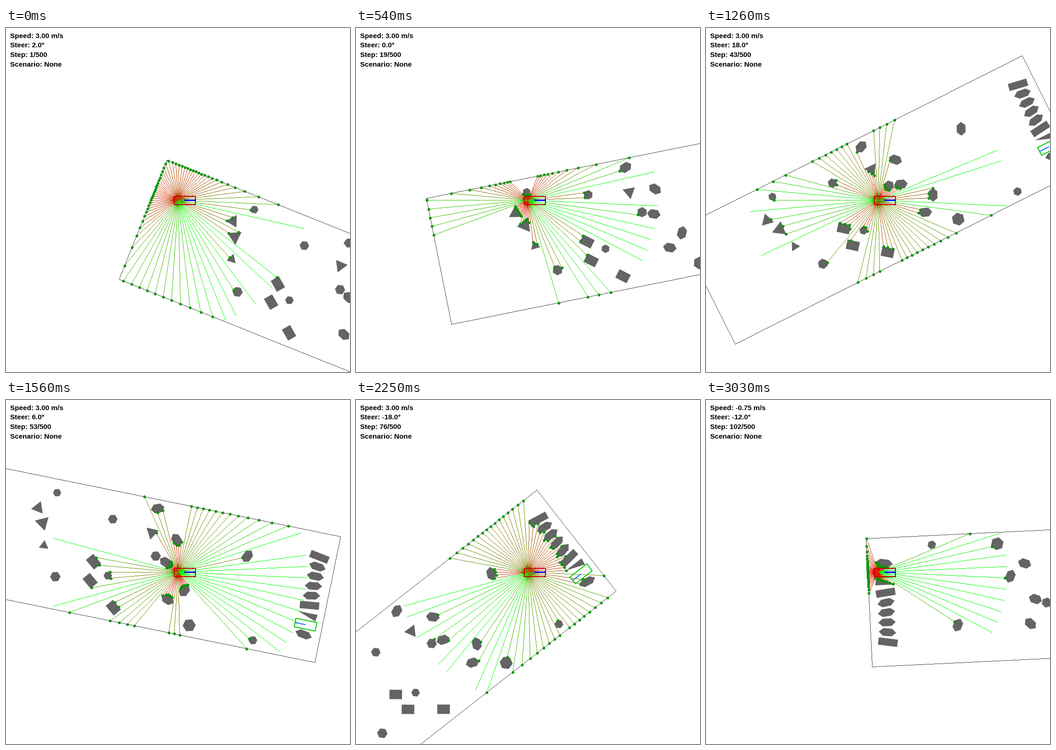
Recreate the animation shown at these times as a matplotlib script. Size 748 by 748 pixels, loop 3.06 s.

```python
import numpy as np
import matplotlib.pyplot as plt
from matplotlib.animation import FuncAnimation
from matplotlib.collections import PolyCollection

SIZE, DPI, FRAMES = 748, 100, 102
PX = 72 / DPI                  # points per pixel
CENTER = np.array([374.0, 374.0])
REACH = 280.5                  # lidar range
STEP = 9.35 / 3                # pixels per frame for 1 m/s
WHEELBASE = 29
ROOM = np.array([839.5, 279.3])
SLOT = np.array([803, 52.3])   # first parking slot
PITCH = 21.5                   # distance between slots
REVERSE_AT = 88

# frame, x, y, heading, steer
KEYS = [
    (0, 55.2, 71.8, -21.8, 2),
    (18, 216.4, 47.4, 11.35, 0),
    (33, 348.7, 94.3, 25.1, 0),
    (42, 418.6, 139.6, 26.75, 18),
    (63, 607.3, 122.2, -12.42, 0),
    (67, 644.0, 114.4, -10, -8),
    (86, 747.4, 225.0, 105.2, -18),
    (REVERSE_AT, 740.7, 242.5, 117, -18),
    (101, 816.8, 205.1, 182.75, -12),
]

ROUND = [(216.5, 29.2, 9), (360.4, 184, 9.3), (697.6, 259, 9.6),      # x, y, radius
         (249, 209, 11.4), (346.5, 61.5, 10.4), (454, 121.6, 11.2),
         (555.3, 254.6, 14.3)]
OVAL = [(437.5, 19.2, -22), (491.5, 77.7, 45), (478.2, 130.5, 21),    # x, y, angle
        (498, 209, 21), (530.2, 182.7, 115), (649.5, 82, 115)]
CRATES = [(324, 160.6), (325, 202.5), (386, 250)]
TRIANGLES = [(182.7, 69.9, 15.6, 40), (198.7, 99.7, 17.8, 64),        # x, y, radius, angle
             (211.2, 147.5, 12, 25), (435.6, 73.1, 15.7, 91)]


def rotation(deg):
    a = np.radians(deg)
    return np.array([[np.cos(a), -np.sin(a)], [np.sin(a), np.cos(a)]])


def place(unit, x, y, rx, ry, deg):
    return unit * (rx, ry) @ rotation(deg).T + (x, y)


def ngon(n):
    a = 2 * np.pi * np.arange(n) / n
    return np.column_stack([np.cos(a), np.sin(a)])


HEX, TRI = ngon(6), ngon(3)
BOX = np.array([(-1, -1), (1, -1), (1, 1), (-1, 1)])
WEDGE = np.array([(-1, -0.3), (1, -0.3), (0.9, 0.7)])


def parked(i, kind):
    x, y = SLOT + (0, i * PITCH)
    tilt = 10 * np.cos(0.8 * i)
    if kind == "box":
        return place(BOX, x, y, 21, 8, tilt)
    if kind == "wedge":
        return place(WEDGE, x, y, 21.5, 15, 0)
    return place(HEX, x, y, 19, 9.6, tilt)


row = ["box"] + ["hex"] * 4 + ["box", "wedge", "free", "hex"]
obstacles = (
    [place(HEX, x, y, r, r, 45) for x, y, r in ROUND]
    + [place(HEX, x, y, 15, 11, a) for x, y, a in OVAL]
    + [place(BOX, x, y, 13.7, 10.2, 38.5) for x, y in CRATES]
    + [place(TRI, x, y, r, r, a) for x, y, r, a in TRIANGLES]
    + [parked(i, kind) for i, kind in enumerate(row) if kind != "free"])
room = (BOX + 1) / 2 * ROOM
spot = SLOT + (0, row.index("free") * PITCH)
goal = place(BOX, *spot, 23.3, 9.5, 180)
goal_arrow = np.array([spot, spot - (23.3, 0)])

solids = obstacles + [room]
seg_a = np.vstack(solids)
seg_b = np.vstack([np.roll(s, -1, axis=0) for s in solids])
ray_angle = np.linspace(-np.pi, np.pi, 72)
rays = np.column_stack([np.cos(ray_angle), np.sin(ray_angle)])


def motion(x, y, head, steer, speed):
    """Position, velocity and acceleration of a pose."""
    h, v = np.radians(head), speed * STEP
    bend = -np.tan(np.radians(steer)) / WHEELBASE
    return (np.array([x, y]), v * np.array([np.cos(h), np.sin(h)]),
            v * v * bend * np.array([-np.sin(h), np.cos(h)]))


def quintic(start, end, T, t):
    """Smooth path between two poses, with its first two derivatives."""
    (p0, v0, a0), (p1, v1, a1) = start, end
    dp = p1 - p0 - v0 * T - a0 * T * T / 2
    dv = (v1 - v0 - a0 * T) * T
    da = (a1 - a0) * T * T
    c3 = (10 * dp - 4 * dv + da / 2) / T**3
    c4 = (-15 * dp + 7 * dv - da) / T**4
    c5 = (6 * dp - 3 * dv + da / 2) / T**5
    pos = p0 + v0 * t + a0 * t**2 / 2 + c3 * t**3 + c4 * t**4 + c5 * t**5
    vel = v0 + a0 * t + 3 * c3 * t**2 + 4 * c4 * t**3 + 5 * c5 * t**4
    acc = a0 + 6 * c3 * t + 12 * c4 * t**2 + 20 * c5 * t**3
    return pos, vel, acc


def car_state(frame):
    back = frame > REVERSE_AT
    sign = -1 if back else 1
    k0, k1 = next(p for p in zip(KEYS, KEYS[1:]) if frame <= p[1][0])
    start = motion(*k0[1:4], sign * k0[4], sign * 3)
    end = motion(*k1[1:], -0.75 if back else 3)
    pos, vel, acc = quintic(start, end, k1[0] - k0[0], frame - k0[0])
    head = np.degrees(np.arctan2(sign * vel[1], sign * vel[0]))
    rate = np.hypot(*vel)
    bend = sign * (vel[0] * acc[1] - vel[1] * acc[0]) / rate**3
    steer = np.clip(-np.degrees(np.arctan(bend * WHEELBASE)), -18, 18)
    speed = max(-3, -round(4 * rate / STEP) / 4) if back else 3
    return pos, head, 2 * round(steer / 2) + 0.0, speed


def cast(a, b):
    """Distance along every ray to the nearest segment."""
    e, q = b - a, a - CENTER
    det = rays[:, :1] * e[:, 1] - rays[:, 1:] * e[:, 0]
    det = np.where(np.abs(det) < 1e-9, 1e-9, det)
    dist = (q[:, 0] * e[:, 1] - q[:, 1] * e[:, 0]) / det
    along = (q[:, 0] * rays[:, 1:] - q[:, 1] * rays[:, :1]) / det
    hit = (dist > 0) & (along >= 0) & (along <= 1)
    return np.where(hit, dist, np.inf).min(axis=1)


def hairline(canvas, a, b, color):
    """One pixel wide line without smoothing."""
    n = int(np.abs(b - a).max()) + 2
    x, y = np.rint(np.linspace(a, b, n)).astype(int).T
    ok = (x >= 0) & (x < SIZE) & (y >= 0) & (y < SIZE)
    canvas[y[ok], x[ok]] = (*color, 255)


fig = plt.figure(figsize=(SIZE / DPI, SIZE / DPI), dpi=DPI, facecolor="white")
ax = fig.add_axes([0, 0, 1, 1])
ax.axis("off")
lines = ax.imshow(np.zeros((SIZE, SIZE, 4), np.uint8), zorder=4,
                  interpolation="nearest", aspect="auto")
ax.set_xlim(-0.5, SIZE - 0.5)
ax.set_ylim(SIZE - 0.5, -0.5)


def stroke(color, width, z):
    return ax.plot([], [], color=color, lw=width * PX, zorder=z,
                   solid_joinstyle="miter", solid_capstyle="butt")[0]


blocks = PolyCollection([], facecolors="#646464", linewidths=0, zorder=2)
ax.add_collection(blocks, autolim=False)
goal_box = stroke("#00c800", 2, 3)
goal_line = stroke("#0078ff", 2, 3)
dots = ax.scatter([], [], s=(6 * PX) ** 2, c="#009600", linewidths=0, zorder=5)
car_box = stroke("#c80000", 2, 6)
car_box.set_data(*place(BOX[[0, 1, 2, 3, 0]], 388.5, 374.5, 23, 9, 0).T)
car_line = stroke("#0000ff", 3, 7)
car_line.set_data([386.5, 411.5], [374, 374])
labels = [ax.text(8.6, 21.5 + 20.5 * i, "", family="Liberation Sans",
                  weight="bold", size=15.3 * PX, va="baseline", zorder=8)
          for i in range(4)]


def draw(frame):
    pos, head, steer, speed = car_state(frame)
    turn = rotation(-head).T

    def view(p):
        return (p - pos) @ turn + CENTER

    blocks.set_verts([view(o) for o in obstacles])
    goal_box.set_data(*view(goal[[0, 1, 2, 3, 0]]).T)
    goal_line.set_data(*view(goal_arrow).T)

    dist = cast(view(seg_a), view(seg_b))
    hit = dist < REACH
    dist = np.minimum(dist, REACH)
    ends = CENTER + rays * dist[:, None]
    dots.set_offsets(ends[hit])

    canvas = np.zeros((SIZE, SIZE, 4), np.uint8)
    walls = view(room)
    for a, b in zip(walls, np.roll(walls, -1, axis=0)):
        hairline(canvas, a, b, (70, 70, 70))
    for end, k in zip(ends, dist / REACH):
        hairline(canvas, CENTER, end, (int(255 * (1 - k)), int(255 * k), 0))
    lines.set_data(canvas)

    texts = (f"Speed: {speed:.2f} m/s", f"Steer: {steer:.1f}°",
             f"Step: {frame + 1}/500", "Scenario: None")
    for label, text in zip(labels, texts):
        label.set_text(text)
    return []


anim = FuncAnimation(fig, draw, frames=FRAMES, init_func=lambda: [],
                     interval=30, repeat=True, repeat_delay=0, blit=False)
plt.show()
```
